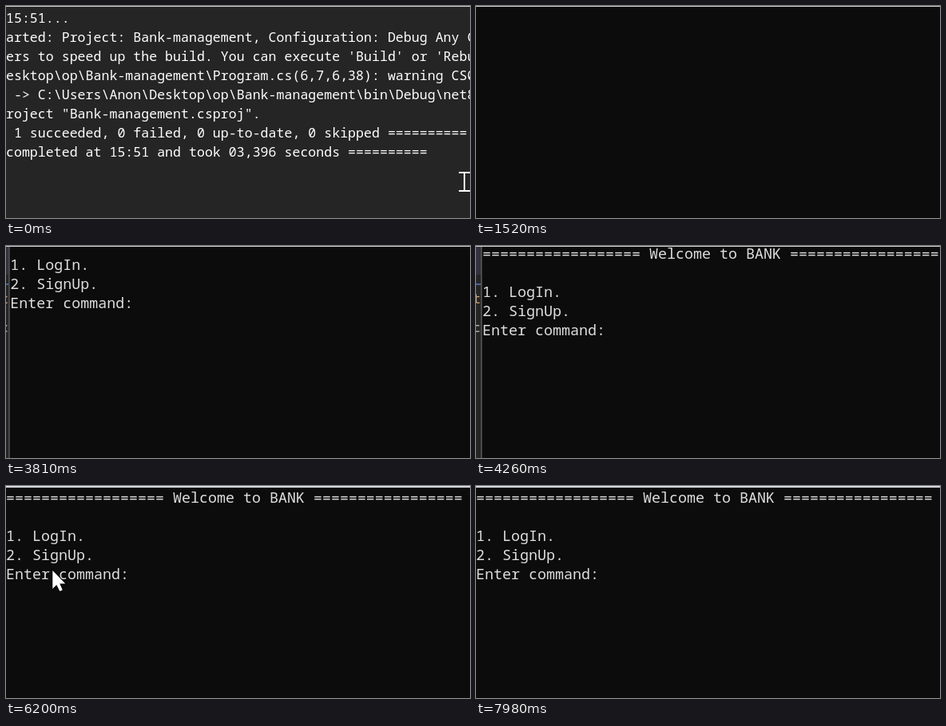
Write an HTML page with a canvas that moves like this. It is 581 by 266 pixels and loops after 8 s.

```html
<!DOCTYPE html>
<html lang="en">
<head>
<meta charset="utf-8">
<title>Build and console</title>
<style>
  html, body { margin: 0; overflow: hidden; background: #0c0c0c; }
  canvas { display: block; }
</style>
</head>
<body>
<canvas width="581" height="266"></canvas>
<script>
const LOOP = 8000, W = 581, H = 266, LINE = 24;
const ctx = document.querySelector('canvas').getContext('2d');

const buildLog = [
  '15:51...',
  'arted: Project: Bank-management, Configuration: Debug Any CPU',
  "ers to speed up the build. You can execute 'Build' or 'Rebuild",
  'esktop\\op\\Bank-management\\Program.cs(6,7,6,38): warning CS0105',
  ' -> C:\\Users\\Anon\\Desktop\\op\\Bank-management\\bin\\Debug\\net8.0',
  'roject "Bank-management.csproj".',
  ' 1 succeeded, 0 failed, 0 up-to-date, 0 skipped ==========',
  'completed at 15:51 and took 03,396 seconds ==========',
];
const menu = [
  '='.repeat(18) + ' Welcome to BANK ' + '='.repeat(17),
  '',
  '1. LogIn.',
  '2. SignUp.',
  'Enter command:',
];

// Points are evenly spaced in time; motion advances in discrete steps.
const dragDown = { from: 3410, to: 4130, step: 65.4, points: [[-30, -118], [-8, -84], [3.5, -45], [11, -18], [12, -6]] };
const dragSettle = { from: 4260, to: 4530, step: 90, points: [[8, -5], [0, 0]] };
const pointerUp = { from: 2370, to: 2910, step: 67.5, points: [[514, 132], [471, 60], [408, -15]] };
const pointerLoop = {
  from: 5450, to: 7905.2, step: 68.2,
  points: [[376, 9], [350, 90], [285, 190], [205, 242], [130, 215], [75, 140], [45, 80],
    [17, 70], [60, 100], [150, 108], [212, 65], [156, 7], [126, 30], [150, 75],
    [225, 120], [320, 160], [415, 200], [512, 243], [537, 264]],
};

function positionOn({ from, to, step, points }, t) {
  const last = points.length - 1;
  const elapsed = Math.floor((t - from) / step) * step;
  const u = Math.max(0, Math.min(1, elapsed / (to - from))) * last;
  const i = Math.min(last - 1, Math.floor(u)), f = u - i;
  const at = k => points[Math.max(0, Math.min(last, k))];
  return [0, 1].map(axis => {
    const [a, b, c, d] = [-1, 0, 1, 2].map(k => at(i + k)[axis]);
    return b + f / 2 * (c - a + f * (2 * a - 5 * b + 4 * c - d + f * (3 * (b - c) + d - a)));
  });
}

function rect(color, x, y, w, h) {
  ctx.fillStyle = color;
  ctx.fillRect(x, y, w, h);
}

function text(lines, x, baseline, size, color) {
  ctx.font = `${size}px "Noto Sans Mono", monospace`;
  ctx.fillStyle = color;
  lines.forEach((line, i) => ctx.fillText(line, x, baseline + i * LINE));
}

function drawArrow([x, y]) {
  const arrow = new Path2D('M0 0V23L5 18L9 26L12.5 24.5L9 16.5H16Z');
  ctx.save();
  ctx.translate(x, y);
  ctx.strokeStyle = '#000';
  ctx.lineWidth = 2;
  ctx.stroke(arrow);
  ctx.fillStyle = '#fff';
  ctx.fill(arrow);
  ctx.restore();
}

function drawTextCursor() {
  ctx.strokeStyle = '#fff';
  ctx.lineWidth = 2;
  ctx.stroke(new Path2D('M567 209H581M574 209V232M567 232H581'));
}

function drawBuild(t) {
  rect('#252526', 0, 0, W, H);
  if (t < 1180) text(buildLog, 0, 20.5, 16.6, '#fff');
  if (t < 70) drawTextCursor();
}

// Editor showing behind the console's left edge
function drawEditorStrip(width) {
  rect('#252526', 0, 0, width, H);
  rect('#33323f', 0, 0, width, 36);
  rect('#4d5f9c', 0, 47, width, 2);
  text(['t'], width - 10, 72, 16.6, '#d8a878');
  text(['c'], width - 10, 108, 16.6, '#bbb');
  rect('#5a5a5a', width, 0, 1.5, H);
}

function drawConsole(t) {
  rect('#0c0c0c', 0, 0, W, H);
  if (t < 3410) return;
  const [x, y] = positionOn(t < 4260 ? dragDown : dragSettle, t);
  text(menu, x, 21 + y, 18.33, '#dedede');
  if (x > 0) drawEditorStrip(x - 2);
  rect('#dfe5e8', 0, 0, W, Math.max(0, 2 + y));
}

function draw() {
  const t = performance.now() % LOOP;
  if (t < 1520) drawBuild(t);
  else drawConsole(t);
  rect('#cfcfcf', 0, 0, W, 1);
  if (t >= 2370 && t < 2990) drawArrow(positionOn(pointerUp, t));
  if (t >= 5450 && t < 7975) drawArrow(positionOn(pointerLoop, t));
  requestAnimationFrame(draw);
}
draw();
</script>
</body>
</html>
```
